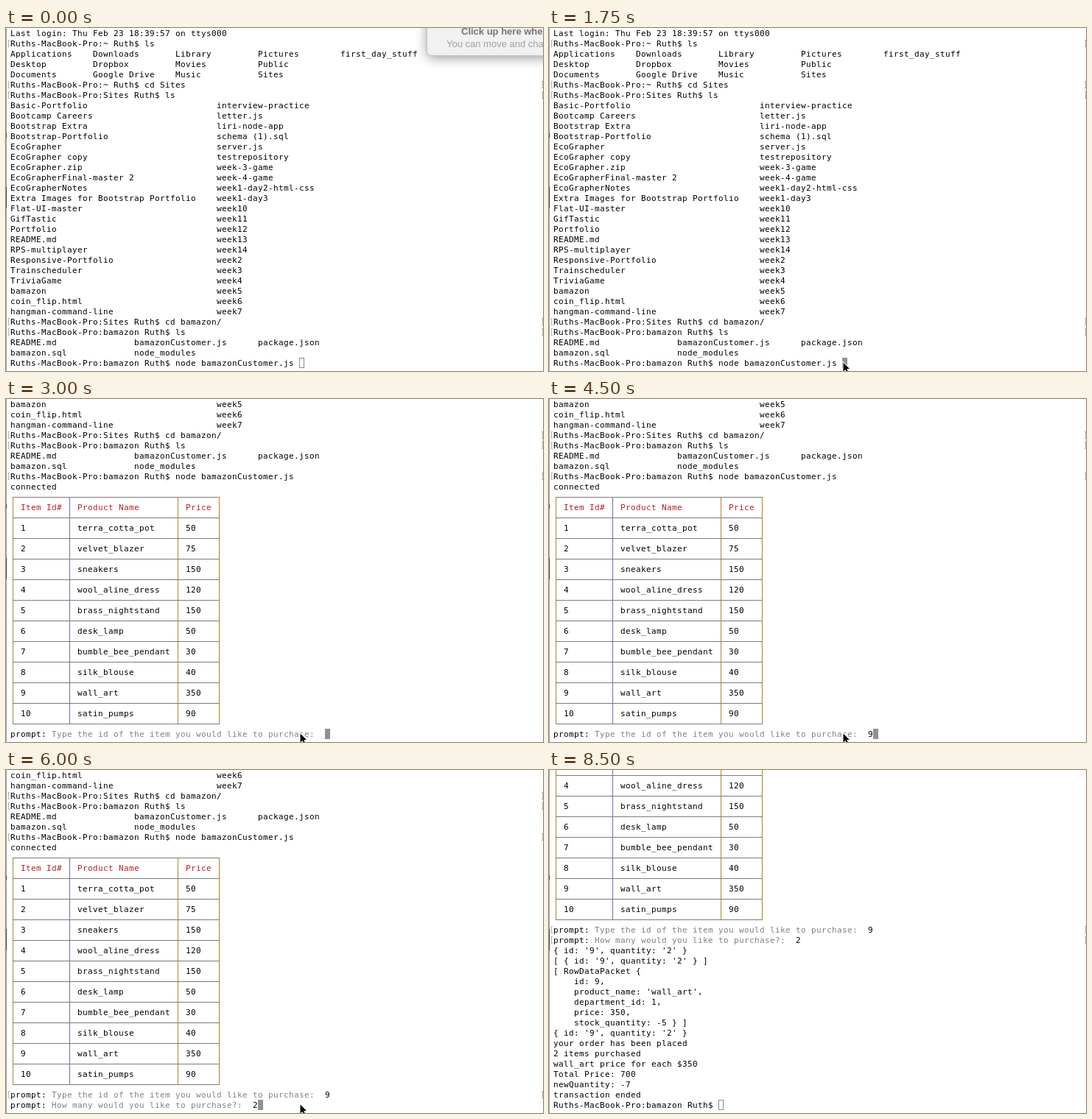
Write an HTML page with a canvas that moves like this. It is 729 px wide and 466 px high and loops after 9250 ms.

```html
<!DOCTYPE html>
<html lang="en">
<head>
<meta charset="utf-8">
<title>Terminal session</title>
<style>
  html, body { margin: 0; width: 100%; height: 100%; overflow: hidden; background: #fff; }
  canvas { display: block; }
</style>
</head>
<body>
<canvas width="729" height="466"></canvas>
<script>
const ctx = document.querySelector('canvas').getContext('2d');
const WIDTH = 729, HEIGHT = 466, LOOP = 9250;
const CELL = 7, ROW = 14, LEFT = 6, ROWS = 33;
const BLACK = '#000', GREY = '#808080', RED = '#b4201e';

// A line is a list of [text, colour] runs; marked lines get brackets once entered.
const line = (text, colour = BLACK) => ({ runs: [[text, colour]] });
const prompt = (dir, command) => ({
  runs: [[`Ruths-MacBook-Pro:${dir} Ruth$ ${command}`, BLACK]], marked: true
});
const ask = (question, answer) => ({
  runs: [['prompt: ', BLACK], [question + '  ', GREY], [answer, BLACK]], marked: true
});
const columns = (width, rows) => rows.trim().split('\n').map(row =>
  line(row.split('|').map(cell => cell.trim().padEnd(width)).join('')));
const product = (id, name, price, colour) =>
  line('  ' + String(id).padEnd(11) + name.padEnd(21) + price, colour);

const products = `terra_cotta_pot 50, velvet_blazer 75, sneakers 150, wool_aline_dress 120,
  brass_nightstand 150, desk_lamp 50, bumble_bee_pendant 30, silk_blouse 40,
  wall_art 350, satin_pumps 90`.split(',').map(item => item.trim().split(' '));

const log = [
  line('Last login: Thu Feb 23 18:39:57 on ttys000'),
  prompt('~', 'ls'),
  ...columns(16, `
    Applications|Downloads|Library|Pictures|first_day_stuff
    Desktop|Dropbox|Movies|Public
    Documents|Google Drive|Music|Sites`),
  prompt('~', 'cd Sites'),
  prompt('Sites', 'ls'),
  ...columns(40, `
    Basic-Portfolio|interview-practice
    Bootcamp Careers|letter.js
    Bootstrap Extra|liri-node-app
    Bootstrap-Portfolio|schema (1).sql
    EcoGrapher|server.js
    EcoGrapher copy|testrepository
    EcoGrapher.zip|week-3-game
    EcoGrapherFinal-master 2|week-4-game
    EcoGrapherNotes|week1-day2-html-css
    Extra Images for Bootstrap Portfolio|week1-day3
    Flat-UI-master|week10
    GifTastic|week11
    Portfolio|week12
    README.md|week13
    RPS-multiplayer|week14
    Responsive-Portfolio|week2
    Trainscheduler|week3
    TriviaGame|week4
    bamazon|week5
    coin_flip.html|week6
    hangman-command-line|week7`),
  prompt('Sites', 'cd bamazon/'),
  prompt('bamazon', 'ls'),
  ...columns(24, `
    README.md|bamazonCustomer.js|package.json
    bamazon.sql|node_modules`),
  prompt('bamazon', 'node bamazonCustomer.js '),
  line('connected')
];
const commandLine = log.length - 2, tableTop = log.length;
log.push(line(''), product('Item Id#', 'Product Name', 'Price', RED), line(''));
products.forEach(([name, price], i) => log.push(product(i + 1, name, price), line('')));
const tableBottom = log.length - 1, askId = log.length;
log.push(
  ask('Type the id of the item you would like to purchase:', '9'),
  ask('How many would you like to purchase?:', '2'),
  ...`{ id: '9', quantity: '2' }
[ { id: '9', quantity: '2' } ]
[ RowDataPacket {
    id: 9,
    product_name: 'wall_art',
    department_id: 1,
    price: 350,
    stock_quantity: -5 } ]
{ id: '9', quantity: '2' }
your order has been placed
2 items purchased
wall_art price for each $350
Total Price: 700
newQuantity: -7
transaction ended`.split('\n').map(text => line(text)),
  prompt('bamazon', '')
);

// [start, last visible line, characters shown on it]
const steps = [
  [0, commandLine, 99],
  [2500, commandLine + 1, 0],
  [3000, askId, 61],
  [4500, askId, 62],
  [5000, askId + 1, 47],
  [6000, askId + 1, 48],
  [6500, log.length - 1, 99]
];
// [start, x, y] of the arrow tip; no position means hidden
const pointerSteps = [
  [0], [500, 515.5, 299.5], [750, 440.5, 386.5], [1000, 402.5, 437], [1250],
  [1500, 399.5, 454.5], [8000, 452.5, 334.5], [8250]
];
const current = (list, t) => list.findLast(step => step[0] <= t);

function rect(x, y, w, h, colour) {
  ctx.fillStyle = colour;
  ctx.fillRect(x, y, w, h);
}

function drawLine({ runs }, y, limit) {
  let col = 0;
  for (const [text, colour] of runs) {
    const shown = text.slice(0, Math.max(0, limit - col));
    ctx.fillStyle = colour;
    ctx.fillText(shown, LEFT + col * CELL, y + 11);
    col += shown.length;
  }
  return col;
}

function drawMarks(y) {
  const colour = '#b4b4b4';
  rect(3, y + 2, 1, 10, colour);
  rect(728, y + 2, 1, 10, colour);
  for (const end of [2, 11]) {
    rect(3, y + end, 2, 1, colour);
    rect(727, y + end, 2, 1, colour);
  }
}

function drawTable(top) {
  const y = top * ROW + 7, height = (tableBottom - tableTop) * ROW;
  for (const col of [0, 11, 32, 40])
    rect(9 + col * CELL, y, 1, height, col === 11 ? '#7868b4' : '#b0832c');
  for (let dy = 0; dy <= height; dy += 2 * ROW) rect(9, y + dy, 281, 1, '#7c7c7c');
}

function drawCursor(col, focused) {
  const x = LEFT + col * CELL, y = (ROWS - 1) * ROW;
  if (focused) return rect(x, y, CELL, ROW, '#919191');
  ctx.strokeStyle = '#8c8c8c';
  ctx.lineWidth = 1;
  ctx.strokeRect(x + .5, y + .5, CELL - 1, ROW - 1);
}

const arrow = new Path2D('M0 0V12L2.8 9.4 4.6 13.4 6.6 12.5 4.9 8.6H8.5Z');
function drawPointer(x, y) {
  ctx.save();
  ctx.translate(x, y);
  ctx.strokeStyle = '#fff';
  ctx.lineWidth = 2;
  ctx.stroke(arrow);
  ctx.fillStyle = BLACK;
  ctx.fill(arrow);
  ctx.restore();
}

function drawNotice() {
  ctx.save();
  ctx.shadowColor = 'rgba(0,0,0,.4)';
  ctx.shadowBlur = 16;
  ctx.shadowOffsetY = 3;
  ctx.fillStyle = '#f1f1f1';
  ctx.beginPath();
  ctx.roundRect(571.5, -20, 200, 57.5, 6);
  ctx.fill();
  ctx.shadowColor = 'transparent';
  ctx.strokeStyle = '#c4c4c4';
  ctx.stroke();
  ctx.letterSpacing = '0px';
  ctx.font = 'bold 13px "Liberation Sans", sans-serif';
  ctx.fillStyle = '#757575';
  ctx.fillText('Click up here when', 618, 9);
  ctx.font = '13px "Liberation Sans", sans-serif';
  ctx.fillStyle = '#a0a0a0';
  ctx.fillText('You can move and change', 598, 26);
  ctx.restore();
}

function draw(t) {
  const [, last, limit] = current(steps, t);
  const first = last - ROWS + 1;
  rect(0, 0, WIDTH, HEIGHT, '#fff');
  rect(0, 0, 1, HEIGHT, '#a2a2a2');
  rect(0, 143, 1, 6, '#444');
  rect(0, 216, 1, 29, '#444');

  ctx.font = '11px "DejaVu Sans Mono", monospace';
  ctx.letterSpacing = '0px';
  ctx.letterSpacing = CELL - ctx.measureText('0').width + 'px';
  let cursorCol = 0;
  for (let i = first; i <= last; i++) {
    const y = (i - first) * ROW;
    cursorCol = drawLine(log[i], y, i === last ? limit : Infinity);
    if (log[i].marked && i < last) drawMarks(y);
  }
  if (last > tableBottom) drawTable(tableTop - first);
  drawCursor(cursorCol, t >= 1750 && t < 8500);
  const [, x, y] = current(pointerSteps, t);
  if (x !== undefined) drawPointer(x, y);
  if (t < 250) drawNotice();
}

const start = performance.now();
function tick() {
  draw((performance.now() - start) % LOOP);
  requestAnimationFrame(tick);
}
tick();
</script>
</body>
</html>
```
